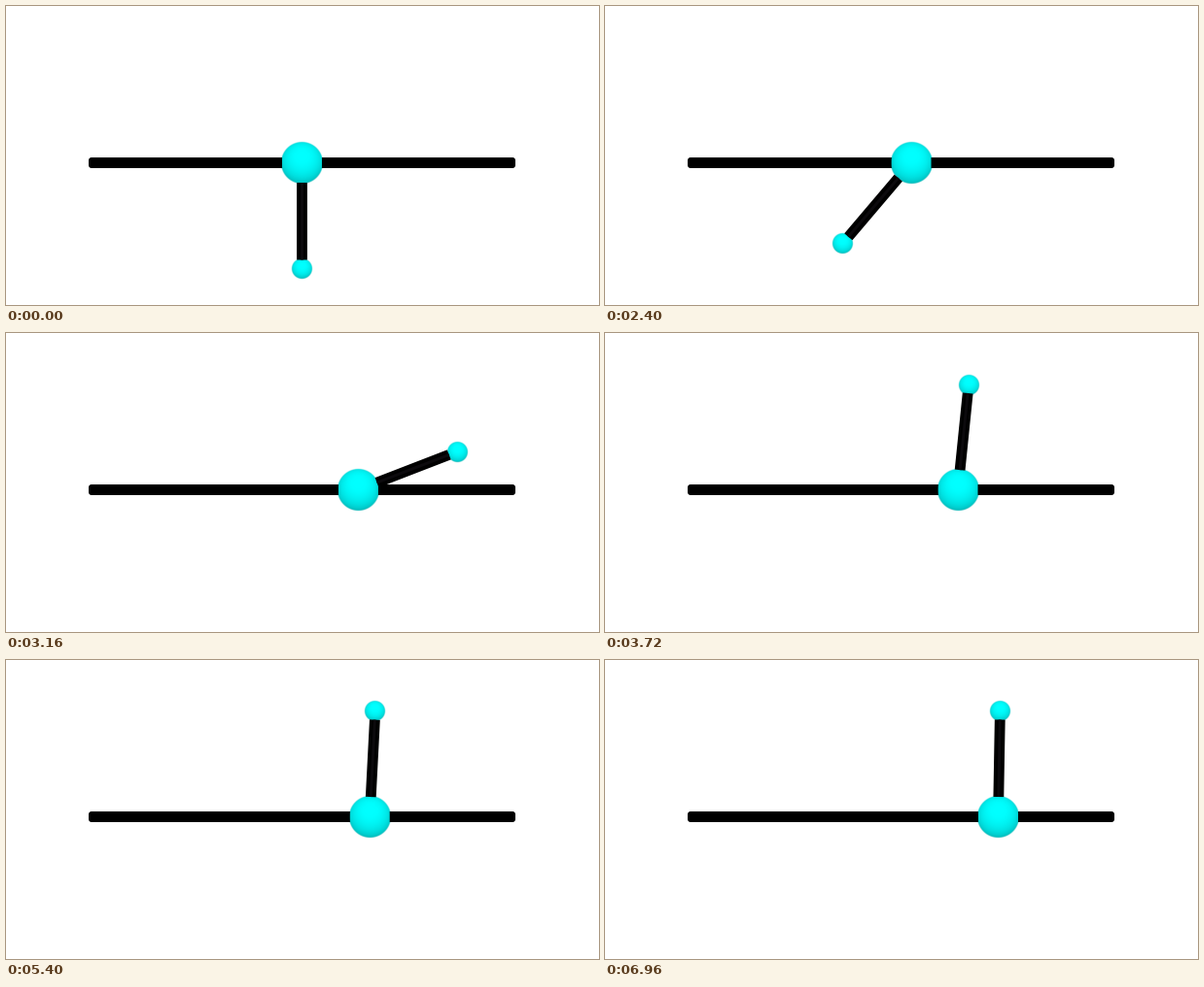
These frames come from a looping animation (610 px wide and 308 px high, 7.04 s). A matplotlib script:

```python
import numpy as np
import matplotlib.pyplot as plt
from matplotlib.animation import FuncAnimation
from matplotlib.patches import FancyBboxPatch

W, H, DPI = 610, 308, 100
STEP, FRAMES = 40, 176
AXIS_Y, ROD = 161.5, 109
BAR_L, BAR_R = 85, 524
CART_R, BOB_R, THICK = 21.2, 10.5, 10.8

# Turning points of the cart: (ms, x in px)
CART = [(960, 304.5), (1300, 306.5), (2060, 263), (2900, 408), (3350, 334),
        (4110, 396), (4350, 397), (5220, 369.5), (6000, 404.5)]

# Swing of the rod: (ms, radians), 0 = hanging, pi = upright
SWING = [(1380, 0), (1780, .18), (2530, -.78), (3160, 1.94), (3720, 3.04),
         (4240, 3.186), (5400, 3.09), (5850, 3.15), (6160, 3.124)]


def glide(keys, t):
    """Smooth curve through the keys that rests at every turning point."""
    kt, kv = np.array(keys, float).T
    h = np.diff(kt)
    d = np.diff(kv) / h
    a, b = d[:-1], d[1:]
    slope = np.zeros_like(kv)
    same = a * b > 0
    slope[1:-1][same] = (2 * a * b)[same] / (a + b)[same]
    t = np.clip(t, kt[0], kt[-1])
    i = np.clip(np.searchsorted(kt, t, side="right") - 1, 0, len(h) - 1)
    u = (t - kt[i]) / h[i]
    ease = u * u * (3 - 2 * u)
    bend = u * (1 - u) * ((1 - u) * slope[i] - u * slope[i + 1])
    return kv[i] + (kv[i + 1] - kv[i]) * ease + h[i] * bend


def add_ball(radius):
    """Lit cyan ball with a soft one-pixel rim."""
    half = radius + 1
    axis = np.linspace(-half, half, int(16 * half)) / radius
    x, y = np.meshgrid(axis, -axis)
    r = np.hypot(x, y)
    z = np.sqrt(np.clip(1 - r * r, 0, 1))
    light = np.clip(.76 + .08 * y + .24 * z, 0, 1)
    alpha = np.clip((1 - r) * radius + .5, 0, 1)
    rgba = np.dstack([np.zeros_like(light), light, light, alpha])
    return ax.imshow(rgba, aspect="auto", zorder=2)


def add_line(width=THICK, color="black", z=3):
    return ax.plot([], [], color=color, lw=width * 72 / DPI, snap=False,
                   solid_capstyle="butt", zorder=z)[0]


def place(ball, x, y, radius):
    half = radius + 1
    ball.set_extent((x - half, x + half, y + half, y - half))


def exit_depth(radius):
    """Distance from a ball's centre at which a cylinder leaves its surface."""
    return np.sqrt(radius ** 2 - (THICK / 2) ** 2)


fig = plt.figure(figsize=(W / DPI, H / DPI), dpi=DPI, facecolor="white")
ax = fig.add_axes([0, 0, 1, 1])
ax.axis("off")

ax.add_patch(FancyBboxPatch((BAR_L, AXIS_Y - 5.5), BAR_R - BAR_L, 11,
                            boxstyle="round,pad=0,rounding_size=3",
                            fc="black", lw=0, zorder=1))
bob, cart = add_ball(BOB_R), add_ball(CART_R)
left, right, rod = add_line(), add_line(), add_line()
sheen = add_line(3, "#0c0a0d", 4)

times = np.arange(FRAMES) * STEP
cart_x = glide(CART, times)
angle = glide(SWING, times)
cart_cut, bob_cut = exit_depth(CART_R), exit_depth(BOB_R)


def draw(i):
    x, a = cart_x[i], angle[i]
    dx, dy = np.sin(a), np.cos(a)
    span = np.array([cart_cut, ROD - bob_cut])
    for line in (rod, sheen):
        line.set_data(x + span * dx, AXIS_Y + span * dy)
    left.set_data([BAR_L + 4, x - cart_cut], [AXIS_Y, AXIS_Y])
    right.set_data([x + cart_cut, BAR_R - 4], [AXIS_Y, AXIS_Y])
    place(bob, x + ROD * dx, AXIS_Y + ROD * dy, BOB_R)
    place(cart, x, AXIS_Y, CART_R)
    ax.set_xlim(0, W)
    ax.set_ylim(H, 0)
    return left, right, rod, sheen, bob, cart


anim = FuncAnimation(fig, draw, frames=FRAMES, interval=STEP, repeat=True,
                     repeat_delay=0, init_func=lambda: draw(0))
plt.show()
```
